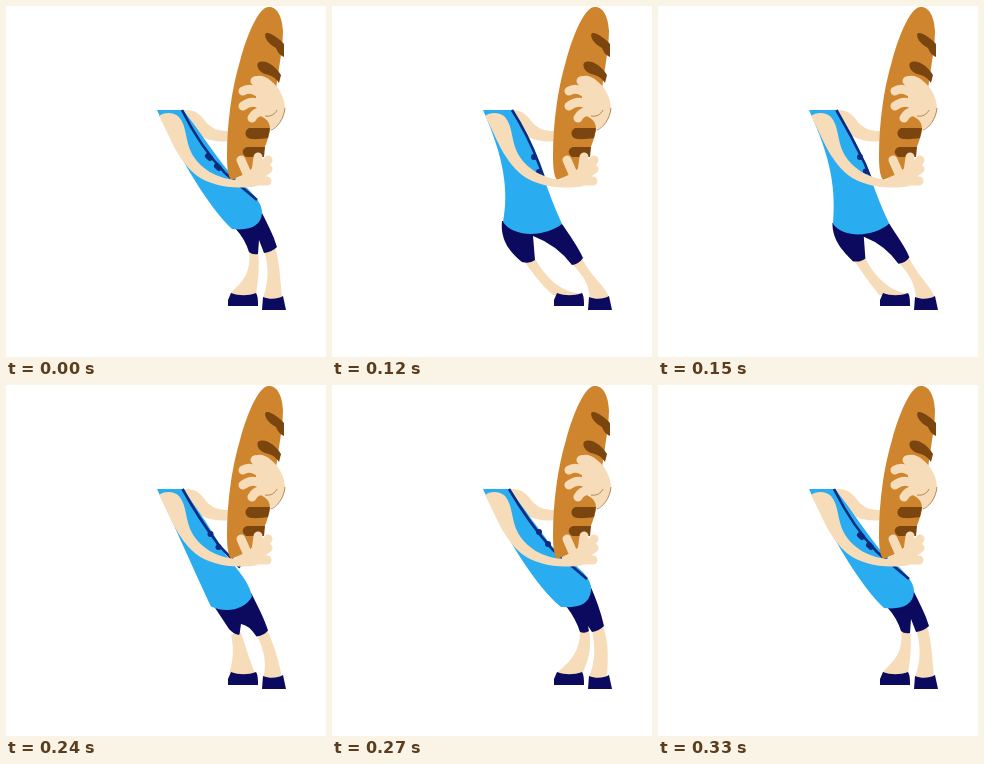
Animation, 320 px wide and 351 px high, one loop 0.36 s. Source, as an HTML page:

```html
<!DOCTYPE html>
<html lang="en">
<head>
<meta charset="utf-8">
<title>Baguette dance</title>
<style>
  html, body { margin: 0; width: 100%; height: 100%; overflow: hidden; background: #fff; }
  svg { display: block; width: 100%; height: 100%; }
  .skin { fill: #f6dcb9; }
  .navy { fill: #0b0a5e; }
  .shirt { fill: #2aacf0; }
  .bread { fill: #cf852e; }
  .crust { fill: #7a450f; }
  .fingers { fill: none; stroke: #f6dcb9; stroke-width: 9; stroke-linecap: round; }
  .placket { fill: none; stroke: #0b2a80; stroke-width: 2.6; }
  .buttons { fill: none; stroke: #0b2a80; stroke-width: 6; stroke-linecap: round; }
  .crease { fill: none; stroke: #a8713a; stroke-width: .8; }
</style>
</head>
<body>
<svg viewBox="0 0 320 351">
  <path class="skin" d="M177 104C190 103 195 109 200 116C206 123 213 125 222 125V135C210 137 197 133 188 126Z"/>

  <path class="skin" id="legs"/>
  <path class="navy" id="shorts"/>
  <path class="navy" d="M225 287C233 290 242 290 250 287C252 290 252 295 252 300H222V294Z"/>
  <path class="navy" d="M257 291C264 294 272 293 277 290L280 304H256Z"/>
  <path class="shirt" id="shirt"/>
  <path class="placket" id="placket"/>
  <path class="buttons" id="buttons"/>

  <path class="bread" d="M263 1C254 0 242 25 234 55C225 85 221 120 221 150C221 162 222 170 225 174L240 168C258 155 266 125 269 95C270 75 277 45 277 25C276 8 270 1 263 1Z"/>
  <g class="crust">
    <path d="M260 27C265 26 275 34 278 38V51C274 49 272 47 270 42C262 38 257 30 260 27Z"/>
    <path d="M252 57C258 52 270 60 275 69L273 77C270 72 265 69 259 68C253 66 250 60 252 57Z"/>
    <path d="M243 122H264L262 132C255 133 246 134 242 132C238 129 239 124 243 122Z"/>
    <path d="M241 141H259L258 151H240C235 147 236 143 241 141Z"/>
  </g>

  <path class="skin" d="M246 72C252 68 260 70 265 75C273 81 279 92 279 103C278 114 271 122 264 123C264 116 260 112 254 110L250 100V82Z"/>
  <path class="fingers" d="M249 75L258 82M237 85Q245 80 256 89M237 100Q246 93 256 99M246 112Q249 106 257 105"/>
  <path class="crease" d="M279 102C278 113 271 122 265 124M259 110C265 111 269 108 271 104"/>

  <path class="skin" d="M153 110C158 106 168 106 173 111C181 120 179 135 186 148C194 162 210 173 232 174L252 180C227 184 205 180 190 169C170 152 164 130 153 110Z"/>
  <path class="skin" d="M230 172C236 169 242 167 246 163L257 164L258 178L240 181H228Z"/>
  <path class="fingers" d="M242 170L235 154M250 166L252 151M252 167L262 154M252 170L262 163M248 175L261 175"/>
</svg>
<script>
// Five poses per part, all with the same path commands so they can be blended.
const parts = {
  shirt: [
    'M151 104L177 104C193 124 208 148 224 167C236 178 257 193 256 207C255 219 246 225 226 223C204 203 172 150 151 104Z',
    'M151 104L179 104C193 128 209 152 218 172C226 186 235 200 243 213C231 227 203 239 186 221C184 186 177 158 151 104Z',
    'M151 104L180 104C194 128 206 152 212 172C217 187 223 203 230 218C215 230 183 233 171 216C177 184 172 152 151 104Z',
    'M151 104L176 104C192 126 208 150 214 172C219 187 226 203 233 217C220 231 193 234 181 221C179 185 177 158 151 104Z',
    'M151 104L177 104C193 124 208 147 224 166C238 175 262 192 259 206C257 219 248 223 229 222C205 203 172 150 151 104Z'
  ],
  placket: [
    'M176 104Q195 142 219 167L251 194',
    'M179 104Q195 132 212 163L217 173',
    'M180 104Q196 129 207 158L212 172',
    'M176 104Q189 130 207 158L213 171',
    'M177 104Q197 138 220 164L255 194'
  ],
  buttons: [
    'M202 150l2 2M211 160l2 2',
    'M204 150l0 0M211 163l0 0',
    'M202 151l0 0M207 166l0 0',
    'M202 151l0 0M209 165l0 0',
    'M207 147l0 0M216 159l0 0'
  ],
  shorts: [
    'M229 222L256 207C261 217 267 228 271 241Q266 246 258 247L253 234L252 248Q246 249 243 246Q239 233 229 222Z',
    'M186 219L243 213C250 224 255 235 259 249Q255 254 247 255Q241 242 228 235L239 251Q239 257 234 259C219 243 193 247 186 219Z',
    'M170 215L230 218C238 230 245 239 251 252Q247 258 240 259Q225 239 201 230L203 254Q198 258 190 256C179 247 168 235 170 215Z',
    'M181 220L233 217C240 230 247 238 252 250Q249 255 241 256Q230 239 213 232L214 250Q210 254 202 254C195 243 184 235 181 220Z',
    'M234 221L258 200C264 214 269 227 272 241Q267 246 260 247L256 241L257 246Q253 249 248 247Q244 234 234 221Z'
  ],
  legs: [
    'M243 245L252 246C254 260 252 275 250 289Q237 293 224 288C233 278 246 270 243 245ZM258 245L269 241C274 257 274 274 276 291Q266 296 257 292C263 275 263 260 258 245Z',
    'M233 257L241 252C247 263 234 270 246 289Q235 293 224 288C229 279 234 270 233 257ZM247 253L258 249C263 265 272 277 274 291Q265 296 257 293C260 280 259 269 247 253Z',
    'M192 255L203 253C213 269 225 285 249 288Q234 293 221 289C210 280 203 270 192 255ZM240 258L250 252C258 270 272 278 277 291Q267 296 258 293C257 280 253 271 240 258Z',
    'M202 253L213 250C221 270 233 280 248 288Q234 293 222 289C217 275 210 268 202 253ZM242 255L252 250C260 267 270 277 276 291Q267 296 258 293C258 278 252 268 242 255Z',
    'M248 246L257 245C260 260 257 276 250 289Q237 293 225 288C235 278 248 270 248 246ZM260 246L271 241C277 257 276 274 275 291Q265 296 257 292C264 275 263 260 260 246Z'
  ]
};

// [start ms, from pose, to pose, blend]
const steps = [
  [0, 0, 0, 0], [60, 1, 1, 0], [120, 2, 2, 0], [150, 2, 3, .4], [210, 3, 3, 0],
  [240, 3, 4, .5], [270, 4, 4, 0], [300, 4, 0, .5], [330, 0, 0, 0]
];
const loopMs = 360;
const number = /\d*\.?\d+/g;

function blend(from, to, amount) {
  const ends = to.match(number);
  let i = 0;
  return from.replace(number, n => +n + (ends[i++] - n) * amount);
}

let shown;
function draw(time) {
  const step = steps.findLast(([start]) => start <= time % loopMs);
  if (step !== shown) {
    const [, from, to, amount] = shown = step;
    for (const [id, poses] of Object.entries(parts))
      document.getElementById(id).setAttribute('d', blend(poses[from], poses[to], amount));
  }
}

const began = performance.now();
function tick() {
  draw(performance.now() - began);
  requestAnimationFrame(tick);
}
tick();
</script>
</body>
</html>
```
